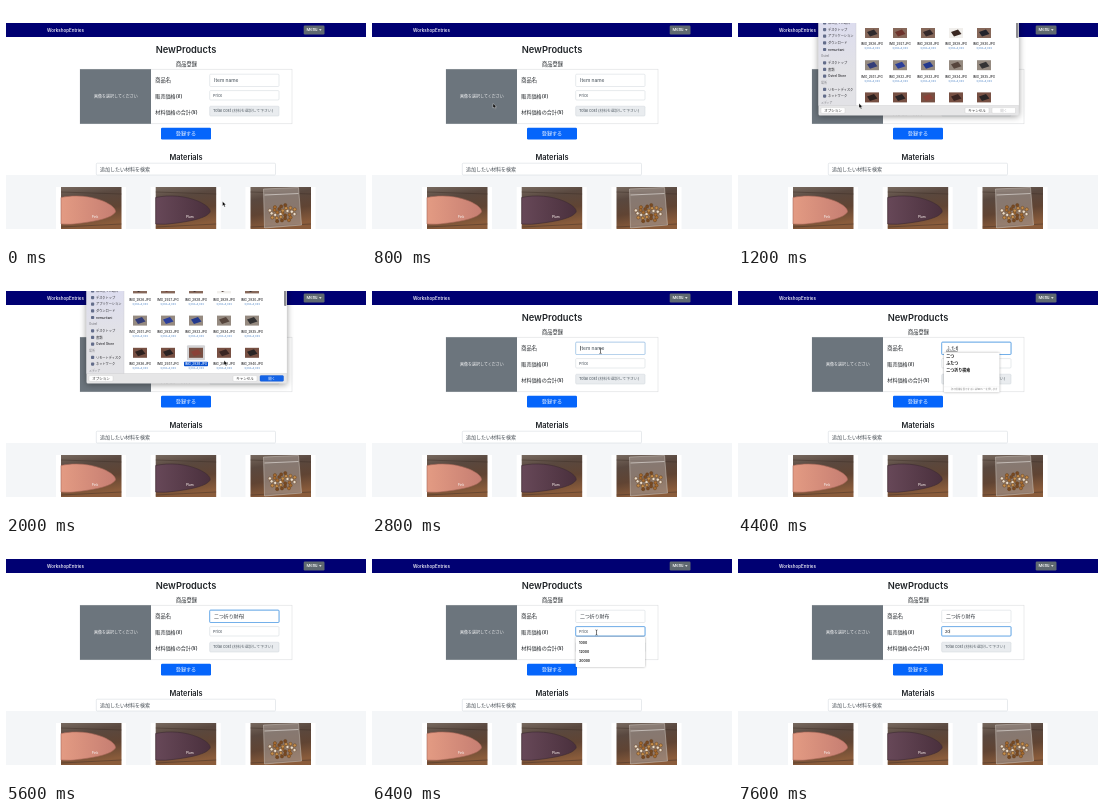
Animation, 360 px wide and 240 px high, one loop 8 s. Source, as an HTML page:

```html
<!DOCTYPE html>
<html lang="ja">
<head>
<meta charset="utf-8">
<title>Product form</title>
<style>
html, body { margin: 0; width: 100%; height: 100%; overflow: hidden; background: #fff; }
svg { display: block; width: 100vw; height: 100vh; }
text { font-family: Inter, "Noto Sans CJK JP", "Noto Sans CJK", sans-serif; font-weight: 500; white-space: pre; }
#dialog { filter: drop-shadow(0 1px 3px rgba(0, 0, 0, .4)); }
.float { filter: drop-shadow(0 .5px 1.2px rgba(0, 0, 0, .35)); }
</style>
</head>
<body>
<svg id="stage" viewBox="0 0 360 240">
  <defs>
    <clipPath id="screen"><rect y="17" width="360" height="206"/></clipPath>
    <clipPath id="fileArea"><rect x="118" y="17" width="163" height="82.5"/></clipPath>
    <linearGradient id="wood" x2=".25" y2="1">
      <stop offset="0" stop-color="#77695f"/>
      <stop offset=".3" stop-color="#59483f"/>
      <stop offset=".65" stop-color="#604433"/>
      <stop offset="1" stop-color="#8a5c3b"/>
    </linearGradient>
    <linearGradient id="pink">
      <stop offset="0" stop-color="#e39b83"/>
      <stop offset="1" stop-color="#c67e72"/>
    </linearGradient>
    <linearGradient id="plum">
      <stop offset="0" stop-color="#674858"/>
      <stop offset="1" stop-color="#4a303d"/>
    </linearGradient>
    <linearGradient id="side" x2="0" y2="1">
      <stop offset="0" stop-color="#dcdcf0"/>
      <stop offset=".6" stop-color="#e2e2e6"/>
    </linearGradient>
  </defs>
  <g clip-path="url(#screen)">
    <g id="page"></g>
    <g id="fields"></g>
    <g id="dialog"></g>
    <g id="popup"></g>
    <g id="pointer"></g>
  </g>
</svg>
<script>
const LOOP = 8000, STEP = 400;
const $ = id => document.getElementById(id);

const rect = (x, y, w, h, fill, more = '') =>
  `<rect x="${x}" y="${y}" width="${w}" height="${h}" fill="${fill}" ${more}/>`;
// y is the vertical middle of the line
const text = (s, x, y, size, fill = '#212529', more = '') =>
  `<text x="${x}" y="${y + size * .36}" font-size="${size}" fill="${fill}" ${more}>${s}</text>`;
const mid = 'text-anchor="middle"';
const bold = 'font-weight="600" style="font-weight:600"';
const outline = (color, r = 1, w = .5) => `rx="${r}" stroke="${color}" stroke-width="${w}"`;
const path = (d, fill, more = '') => `<path d="${d}" fill="${fill}" ${more}/>`;

// last entry whose start time has passed
const latest = (list, t) => list.filter(e => e[0] <= t).pop().slice(1);

function photo(x, item) {
  return rect(x - 5, 181, 70, 44, '#fff') + rect(x, 181, 60.5, 42, 'url(#wood)') +
    path(`M${x} 186l60.5 2M${x} 221l60.5-3`, 'none', 'stroke="#3b2d26" stroke-width=".7" stroke-opacity=".6"') +
    item(x);
}

function leather(fill, edge, label) {
  return x => path(`M${x} 191.5C${x + 14} 188.5 ${x + 30} 190 ${x + 42} 195C${x + 50} 198.5 ${x + 55} 202.5 ${x + 54.5} 206` +
    `C${x + 51} 212 ${x + 36} 215 ${x + 21} 217Q${x + 9} 219 ${x} 218Z`, fill, `stroke="${edge}" stroke-width=".6"`) +
    text(label, x + 34, 211, 3.2, '#f3e8e4', mid);
}

function rivetBag(x) {
  let s = path(`M${x + 13} 183L${x + 48} 181.5L${x + 51} 219L${x + 14} 222Z`, '#a59a93',
    'fill-opacity=".6" stroke="#cdc4bd" stroke-width=".5"') +
    path(`M${x + 14} 189L${x + 48} 187.5`, 'none', 'stroke="#dcd6d1" stroke-width=".7"');
  for (let i = 0; i < 28; i++) {
    const r = Math.sqrt(i / 28), a = i * 2.4;
    const cx = x + 32 + 14 * r * Math.cos(a), cy = 207 + 9 * r * Math.sin(a);
    s += `<circle cx="${cx}" cy="${cy}" r="1.6" fill="${['#a86c30', '#e9dccb', '#c58e4c', '#7a4a22'][i % 4]}" stroke="#65401f" stroke-width=".5"/>`;
  }
  return s;
}

function page() {
  const photos = [
    [55, leather('url(#pink)', '#a9695a', 'Pink')],
    [149.7, leather('url(#plum)', '#3d2a33', 'Plum')],
    [244.5, rivetBag]
  ];
  return rect(0, 17, 360, 206, '#fff') +
    rect(0, 17, 360, 14, '#000072') +
    text('WorkshopEntries', 41, 24, 4.5, '#fff') +
    rect(297.7, 19.5, 20.8, 9, '#5f6970', 'rx="1.2"') +
    text('Menu', 300.5, 24, 4.1, '#fff') + path('M313 23.3h2.6l-1.3 1.4z', '#fff') +
    text('NewProducts', 180, 43.7, 9.3, '#212529', `${mid} ${bold}`) +
    text('商品登録', 180.5, 58, 5.2, '#212529', mid) +
    rect(74, 63.2, 212, 54.6, '#fff', outline('#d6d8da', 0)) +
    rect(74, 63.2, 71, 54.6, '#6c757d') +
    text('画像を選択してください', 110, 90.3, 4, '#f1f2f3', mid) +
    text('商品名', 149.3, 74.3, 5.2) +
    text('販売価格(¥)', 149.3, 90.3, 5.1) +
    text('材料価格の合計(¥)', 149.3, 106.5, 5.1) +
    rect(203.7, 100.2, 69.3, 9.8, '#e9ecef', outline('#ced4da')) +
    text('Total cost (材料を選択して下さい)', 207, 105.1, 3.85, '#5d666e') +
    rect(155, 121.7, 50, 11.7, '#0565fb', 'rx="1.2"') +
    text('登録する', 180, 127.5, 5.1, '#fff', mid) +
    text('Materials', 180, 151, 7.4, '#212529', `${mid} ${bold}`) +
    rect(0, 169, 360, 54, '#f4f6f8') +
    rect(90.3, 157.2, 179.2, 11.8, '#fff', outline('#ced4da')) +
    text('追加したい材料を検索', 94, 163.2, 5, '#495057') +
    photos.map(p => photo(...p)).join('');
}

const sidebar = ['最近使った項目', 'デスクトップ', 'アプリケーション', 'ダウンロード', 'nemuritani', '#Ostrel',
  'デスクトップ', '書類', 'Ostrel Store', '#場所', 'リモートディスク', 'ネットワーク', '#メディア'];
const itemColors = ['#2e2a2d', '#6d332c', '#34282a', '#3a2822', '#24242c',
  '#343d78', '#2c3f9a', '#243a8e', '#57463d', '#343334',
  '#2e211f', '#2a2324', '#8a4238', '#3b2522', '#2a2525'];
const backdrops = ['#86685a', '#958a80', '#775043'];

function file(i, scroll, picked) {
  const row = Math.floor(i / 5), x = 134 + i % 5 * 28, y = 27 + row * 32.2 - scroll;
  return (picked ? rect(x - 9, y - 7.5, 18, 15, '#d4d4d6', 'rx="1"') +
      rect(x - 12, y + 9, 24, 4.4, '#0a52d0', 'rx=".8"') : '') +
    rect(x - 7, y - 5, 14, 10, i === 3 ? '#f1efec' : backdrops[row]) +
    path(`M${x - 5} ${y - 1}L${x + 2} ${y - 3.5}L${x + 5.5} ${y + 1}L${x - 2} ${y + 3.5}Z`, itemColors[i]) +
    text(`IMG_${2926 + i}.JPG`, x, y + 11.2, 3.1, picked ? '#fff' : '#28282b', mid) +
    text('4,032×3,024', x, y + 15.5, 2.5, '#6594cd', mid);
}

function button(label, x, w, primary, faded) {
  return rect(x, 101.6, w, 5.7, primary ? '#1463e6' : '#fff', outline(primary ? '#0a52d0' : '#c9c9cb', 1, .4)) +
    text(label, x + w / 2, 104.5, 3.5, primary ? '#fff' : faded ? '#b8b8bb' : '#222', mid);
}

function dialog(scroll, picked) {
  let s = rect(80.5, 10, 200.3, 99.6, '#e6e6e7', 'rx="1.5"') +
    rect(118, 10, 162.8, 89.5, '#fff') + rect(80.5, 10, 37.5, 89.5, 'url(#side)') +
    path('M118 17V99.5M80.5 99.5H280.8', 'none', 'stroke="#c8c8cb" stroke-width=".4"') +
    rect(278, 10, 2.5, 22, '#8c8c90', 'rx="1"');
  sidebar.forEach((name, i) => {
    const y = 16.9 + i * 6.65;
    s += name[0] === '#'
      ? text(name.slice(1), 83, y, 2.9, '#7c7c82')
      : rect(85, y - 1.6, 3.2, 3.2, '#626c8a', 'rx=".8"') + text(name, 90, y, 3.2, '#28282c');
  });
  s += '<g clip-path="url(#fileArea)">' +
    itemColors.map((_, i) => file(i, scroll, picked && i === 12)).join('') + '</g>';
  return s + button('オプション', 83, 24, false) + button('キャンセル', 227, 24, false) +
    button('開く', 254, 23.5, picked, true);
}

const textWidth = (s, size) => [...s].reduce((n, c) => n + (c > '\u3000' ? 1 : c > '9' ? .37 : .61), 0) * size;

// focus runs from 0 to 1
function input(y, h, size, hint, value, focus, caret, composing) {
  const x = 203.7, tx = size > 4 ? 208 : 207, cy = y + h / 2, w = textWidth(value, size);
  return rect(x - .6, y - .6, 70.5, h + 1.2, '#c4defb', `rx="1.5" opacity="${focus}"`) +
    rect(x, y, 69.3, h, '#fff', outline('#ced4da')) +
    rect(x, y, 69.3, h, 'none', outline('#489bea', 1, .7) + ` opacity="${focus}"`) +
    text(value || hint, tx, cy, size, value ? '#343a40' : '#5d666e') +
    (composing ? rect(tx, cy + 2.8, w, .4, '#333') : '') +
    (caret ? rect(tx + w, cy - size * .5, .4, size, '#222') : '');
}

function candidates(list) {
  return '<g class="float">' + rect(206, 78.7, 55.5, 39.5, '#fff', 'rx=".8"') + '</g>' +
    list.map((s, i) => text(s, 208.3, 83 + i * 6.6, 4, '#111', bold)).join('') +
    path('M206 112.8h55.5', 'none', 'stroke="#e2e2e2" stroke-width=".3"') +
    text('次の候補を表示するにはtabキーを押します', 259.5, 115.5, 2.4, '#888', 'text-anchor="end"');
}

function history() {
  return '<g class="float">' + rect(203.7, 95, 69.3, 30, '#fff', 'rx=".8"') + '</g>' +
    ['1000', '12000', '30000'].map((s, i) => text(s, 207, 100.8 + i * 8.9, 3.4, '#111', bold)).join('');
}

const cursors = {
  none: () => '',
  arrow: (x, y) => path(`M${x} ${y}v4.6l1.1-1 .8 1.8.9-.4-.8-1.7h1.5z`, '#000', 'stroke="#fff" stroke-width=".35"'),
  beam: (x, y) => path(`M${x - 1} ${y - 2.6}q1 0 1 .7q0-.7 1-.7M${x} ${y - 2}v4M${x - 1} ${y + 2.6}q1 0 1-.7q0 .7 1 .7`,
    'none', 'stroke="#222" stroke-width=".6"')
};

const pointerAt = [[0, 'arrow', 216.5, 195.5], [400, 'arrow', 168, 140], [800, 'arrow', 121, 97.5],
  [1600, 'arrow', 176, 86], [2000, 'arrow', 218, 86.5], [2400, 'arrow', 264, 103], [2800, 'beam', 228.5, 77],
  [3600, 'none'], [6000, 'beam', 224.5, 90.5], [7200, 'none']];
const nameAt = [[0, ''], [3600, 'f'], [4000, 'ふt'], [4400, 'ふたt'], [4800, 'ふたつおr'], [5200, '二つ折り財布']];
const priceAt = [[0, ''], [7200, '2'], [7600, '20']];
const listAt = [[0], [4000, 'ふた', '二', '二つ'], [4400, '二つ', 'ふたつ', '二つ折り検索'],
  [4800, '二つ折り', 'ふたつおり', '二つ折り財布'], [5200]];
const nameFocusAt = [[0, 0], [2800, .4], [3200, 1], [6400, 0]];

function draw(t) {
  const [name] = latest(nameAt, t), [price] = latest(priceAt, t), list = latest(listAt, t);
  const [kind, x, y] = latest(pointerAt, t), [nameFocus] = latest(nameFocusAt, t);
  const priceFocus = t >= 6400 ? 1 : 0;
  $('fields').innerHTML =
    input(68.2, 12.3, 4.9, 'Item name', name, nameFocus, nameFocus > 0, t >= 3600 && t < 5600) +
    input(84.6, 9.4, 3.8, 'Price', price, priceFocus, price !== '');
  $('dialog').innerHTML = t >= 1200 && t < 2800 ? dialog(t < 1600 ? 0 : 12.6, t >= 2000) : '';
  $('popup').innerHTML = list.length ? candidates(list) : t >= 6400 && t < 7200 ? history() : '';
  $('pointer').innerHTML = cursors[kind](x, y);
}

let shown = -1;
function tick() {
  const t = Math.floor(performance.now() % LOOP / STEP) * STEP;
  if (t !== shown) draw(shown = t);
  requestAnimationFrame(tick);
}

$('page').innerHTML = page();
tick();
</script>
</body>
</html>
```
